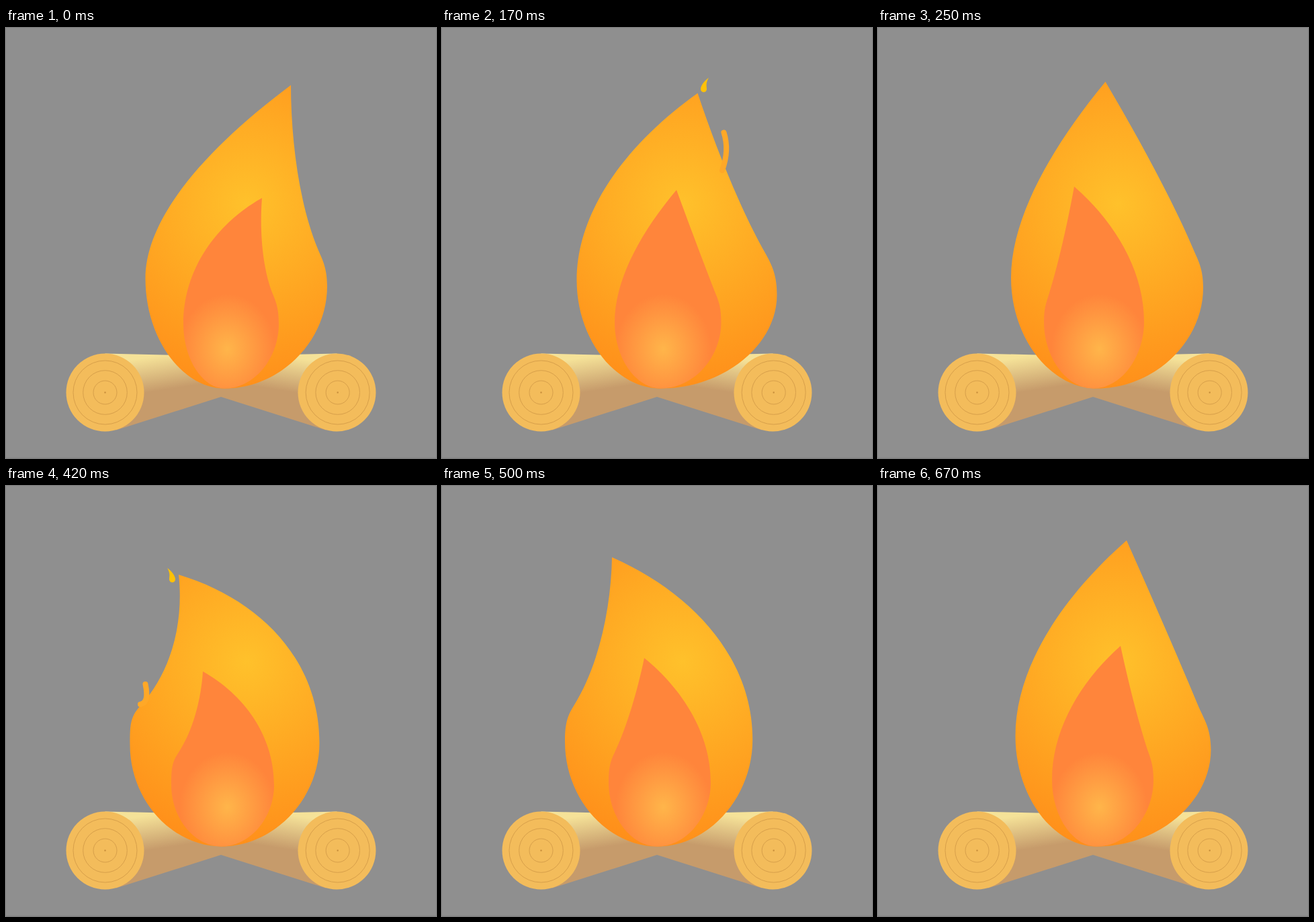
Recreate the animation shown at these times as an HTML page. Size 640 by 640 pixels, loop 760 ms.

```html
<!DOCTYPE html>
<html lang="en">
<head>
<meta charset="utf-8">
<title>Campfire</title>
<style>
html, body { margin: 0; width: 100%; height: 100%; overflow: hidden; background: #8f8f8f; }
svg { display: block; width: 100%; height: 100%; }
</style>
</head>
<body>
<svg viewBox="0 0 640 640">
  <defs>
    <radialGradient id="outerFill" gradientUnits="userSpaceOnUse" cx="358" cy="262" r="275">
      <stop offset="0" stop-color="#ffc12b"/>
      <stop offset="1" stop-color="#ff8f1a"/>
    </radialGradient>
    <radialGradient id="innerFill" gradientUnits="userSpaceOnUse" r="82"
      gradientTransform="translate(329.5 478) scale(.87 1)" cx="0" cy="0">
      <stop offset="0" stop-color="#ffb54a"/>
      <stop offset="1" stop-color="#ff853b"/>
    </radialGradient>
    <linearGradient id="bark" gradientUnits="userSpaceOnUse" x1="212" y1="490" x2="220" y2="541">
      <stop offset="0" stop-color="#f5e298"/>
      <stop offset="1" stop-color="#c69b6b"/>
    </linearGradient>
    <path id="log" fill="url(#bark)" d="M147.5 484.5L330 488.5L320 549L164 598.5Z"/>
    <circle id="disc" cy="542.5" r="58" fill="#f3bc5b"/>
    <g id="rings" fill="none" stroke="#d79f4a">
      <circle cy="542.5" r="47.5"/>
      <circle cy="542.5" r="32.8"/>
      <circle cy="542.5" r="17.5"/>
      <circle cy="542.5" r="1.2" fill="#c98f3c" stroke="none"/>
    </g>
  </defs>
  <rect width="640" height="640" fill="#8f8f8f"/>
  <rect y="639" width="640" height="1" fill="#898989"/>
  <use href="#log"/>
  <use href="#log" transform="matrix(-1 0 0 1 640 0)"/>
  <use href="#disc" x="147.5"/>
  <use href="#rings" x="147.5"/>
  <use href="#disc" x="492.5"/>
  <use href="#rings" x="493.7"/>
  <path id="outer" fill="url(#outerFill)"/>
  <path id="wisp" fill="none" stroke="#ffa827" stroke-width="8" stroke-linecap="round"/>
  <path id="inner" fill="url(#innerFill)"/>
  <path id="drop" fill="#ffc107" d="M7.5-17C.5-12-4.5-5-4.5 0A4.5 4.5 0 0 0 4.5 0C4.5-5 2.5-8 7.5-17Z"/>
</svg>
<script>
const LOOP = 760;
const STARTS = [0, 80, 170, 250, 330, 420, 500, 580, 670];
// Where each step lies along the key poses; halves blend two neighbours.
const PLACES = [0, 0.5, 1, 2, 2.5, 3, 3.5, 4, 5];
const BASE_Y = 536.5;

// Key pose: tip x, tip y, left edge, right edge, flatness of the full side.
const FLAMES = {
  outer: {
    size: 1, top: 80, wide: 372, shoulder: 328,
    poses: [
      [424, 85, 207.5, 478, 0.32],
      [380.5, 97, 200.5, 498.5, 0.262],
      [338.5, 80, 198, 484, 0.333],
      [257, 132, 184.5, 466.5, 0.143],
      [249, 80, 181.5, 458, 0.243],
      [370, 81, 204.5, 495.5, 0.285]
    ]
  },
  inner: {
    size: 0.5, top: 236, wide: 437, shoulder: 398,
    poses: [
      [381, 253, 264, 406, 0.2],
      [349, 241, 257, 415.5, 0.316],
      [292, 236, 247, 396, 0.256],
      [293, 276, 246, 399, 0.2],
      [309, 236, 250, 401, 0.293],
      [361, 238, 259, 410, 0.258]
    ]
  }
};

const SPARKS = {
  2: { drop: "translate(389.5 91)", wisp: "M419.5 155.5Q428 182 417 212" },
  5: { drop: "translate(247.5 139) scale(-1 1)", wisp: "M207.5 295C211 312 210 323 200 325" }
};

const el = id => document.getElementById(id);

function blend(poses, place) {
  const i = Math.floor(place), k = place - i;
  const next = poses[(i + 1) % poses.length];
  return poses[i].map((v, n) => v + (next[n] - v) * k);
}

// Rounded quarter from the widest point to the base.
function belly(x, y, baseX) {
  const k = 0.54;
  return [[x, y + (BASE_Y - y) * k], [baseX + (x - baseX) * k, BASE_Y], [baseX, BASE_Y]];
}

// Full side: one bow from the tip to the widest point.
function fullSide(tipX, tipY, x, y, flat) {
  const dx = x - tipX, dy = y - tipY;
  return [[tipX + 0.57 * dx, tipY + flat * dy], [x, tipY + (0.36 + flat) * dy], [x, y]];
}

// Hollow side: sags in below the tip, then turns over a shoulder.
function hollowSide(tipX, tipY, x, y, shoulder, sag, turn) {
  const h = y - shoulder;
  const kx = x - turn * 0.0045 * h * h;
  const along = (f, s) => [tipX + (kx - tipX) * f - turn * s, tipY + (shoulder - tipY) * f];
  const low = along(0.72, sag * 1.3);
  const slope = (kx - low[0]) / (shoulder - low[1]);
  return [
    along(0.33, sag), low, [kx, shoulder],
    [kx + slope * h * 0.28, shoulder + h * 0.28], [x, y - h * 0.5], [x, y]
  ];
}

function flame({ size, top, wide, shoulder, poses }, place) {
  const [tipX, tipY, left, right, flat] = blend(poses, place);
  const turn = tipX > 320 ? 1 : -1;
  const baseX = 323 + 2.5 * turn;
  const [hollowX, fullX] = turn > 0 ? [right, left] : [left, right];
  const squash = tipY - top;
  const lean = turn * (2 * tipX - left - right) / (right - left);
  const sag = size * (27 * lean + 0.35 * squash - 5);
  const fullY = wide + 0.2 * squash;
  const hollowY = fullY + Math.max(0, Math.abs(hollowX - baseX) - 130) / 2;

  const tip = [tipX, tipY];
  const down = [
    ...hollowSide(tipX, tipY, hollowX, hollowY, shoulder, sag, turn),
    ...belly(hollowX, hollowY, baseX)
  ];
  const up = [
    tip,
    ...fullSide(tipX, tipY, fullX, fullY, flat),
    ...belly(fullX, fullY, baseX)
  ].reverse().slice(1);
  return "M" + tip + "C" + [...down, ...up].join(" ") + "Z";
}

function draw(time) {
  const t = time % LOOP;
  const step = STARTS.filter(start => start <= t).length - 1;
  for (const id in FLAMES) el(id).setAttribute("d", flame(FLAMES[id], PLACES[step]));
  const spark = SPARKS[step];
  el("wisp").setAttribute("d", spark ? spark.wisp : "");
  el("drop").setAttribute("visibility", spark ? "visible" : "hidden");
  if (spark) el("drop").setAttribute("transform", spark.drop);
}

const begin = performance.now();
function tick() {
  draw(performance.now() - begin);
  requestAnimationFrame(tick);
}
tick();
</script>
</body>
</html>
```
